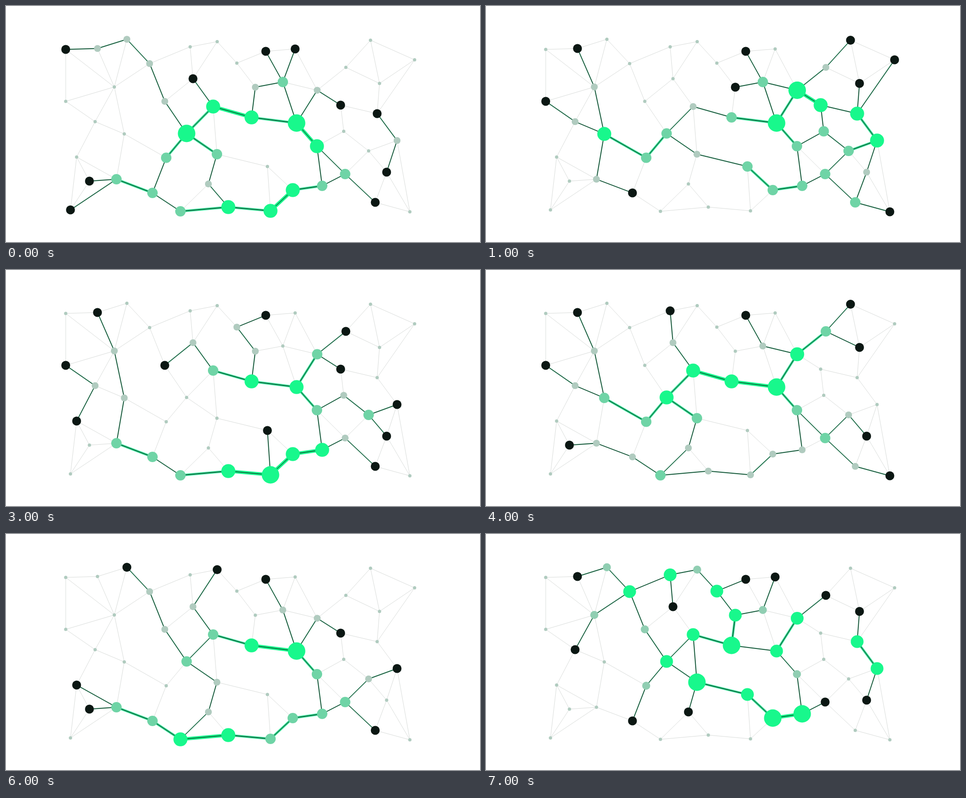
Write an HTML page with a canvas that moves like this. It is 1000 px wide and 500 px high and loops after 8000 ms.

```html
<!DOCTYPE html>
<html lang="en">
<head>
<meta charset="utf-8">
<title>Network</title>
<style>
html, body { margin: 0; height: 100%; overflow: hidden; background: #fff; }
canvas { display: block; }
</style>
</head>
<body>
<canvas id="stage" width="1000" height="500"></canvas>
<script>
const ctx = document.getElementById('stage').getContext('2d');
const GREY = '#b0cbbf', MINT = '#90ceb2', MID = '#6fd4a6', BRIGHT = '#18f88c', BLACK = '#0b1713';
const LINK_COLORS = [MID, '#35e497', BRIGHT];

// Every node has a one-letter name, in this order.
const names = [...'abcdefghijklmnopqrstuvwxyzABCDEFGHIJKLMNOPQRSTUVWX'];
const xy = [
  126, 92, 193, 90, 255, 70.5, 303, 122, 228.5, 171.5, 126, 202, 188, 245, 249.5, 271,
  149, 320, 176, 371, 233, 367, 136, 432, 309, 396, 368, 435, 338, 321.5, 381, 270,
  335, 202, 388.5, 86.5, 445.5, 75.5, 394.5, 154, 437, 213, 445, 314, 427, 377, 469, 426,
  558, 434, 551.5, 340, 605, 390, 667, 381, 656, 297, 613, 248, 518, 236, 526, 172,
  487, 121, 548, 96, 610, 91, 584, 161, 656.5, 178.5, 706, 210, 717, 130, 769, 72.5,
  862, 114, 788, 164, 783, 228, 825, 285, 712.5, 265.5, 765, 307, 715.5, 356, 803, 352,
  779, 416, 852, 436
];
const at = Object.fromEntries(names.map((name, i) => [name, [xy[2 * i], xy[2 * i + 1]]]));

// Each word is a chain of linked nodes.
const web = 'abcdeafgi be ceg efg ehg ijl ilkj ikh kmo mn hopqdrst rtq tuvp pu uEFGHIJF sG ' +
  'HJKI JDEDK DCBU AB CUTSC SLK LQR KMNPM NOPQO RTVRXVWX UW nxyAzy nwx wvz';

// Traffic per second: links that carry one, two and three routes.
const states = [
  ['abcdqp tu vwx omn jkl DKL DJFE HJI CBU CUW QRV', 'upo pv ED km nxy AB', 'uE DC yA'],
  ['beh fgh hkm vpuE vz CBU CSLQO PQ STUWX WVR KJD FJH KMN', 'hop EDC DK zAB TRQ', 'KL'],
  ['baf aedc hk stqdqpv tuEFG nwx vzA CBUWX CDKJI NMP', 'eh drsG vw AB FJ KM', 'uv'],
  ['behk fgi qtu HGFE MKL CSTR TV CBUW mn zy', 'km nx uEDK DC', 'xyAB'],
  ['beh fgh jkmnxyA vwn rtu NMP HJK CBA CUWX VTU', 'hopv pu CDKM', 'uED'],
  ['ab opuv EF EDKJ FG rs MPO vwx nxyzv yABUC UTS TR UWX', 'bc pv uE JF Gs KM', 'cdqp'],
  ['cdqpvwn ikj stu pu DJH DKL CBUW UTR', 'kmn xyAB uE DC', 'nx ED'],
  ['bcdeg drsG rt HGFJI ED KM DCBU wvup pv dqpom PQ RV', 'FEu DK vzA QR', 'AB']
];

// Distinct links of a list of chains, as two sorted letters each.
function links(text) {
  const found = new Set();
  for (const chain of text.split(' ')) {
    for (let i = 1; i < chain.length; i++) found.add([chain[i - 1], chain[i]].sort().join(''));
  }
  return [...found];
}

function line([a, b], width, color) {
  ctx.lineWidth = width;
  ctx.strokeStyle = color;
  ctx.beginPath();
  ctx.moveTo(...at[a]);
  ctx.lineTo(...at[b]);
  ctx.stroke();
}

function dot(name, radius, color) {
  ctx.fillStyle = color;
  ctx.beginPath();
  ctx.arc(...at[name], radius, 0, Math.PI * 2);
  ctx.fill();
}

const shade = part => part > 0.5 ? BRIGHT : part > 0.4 ? MID : part > 0.3 ? MINT : GREY;

function draw(state) {
  ctx.fillStyle = '#fff';
  ctx.fillRect(0, 0, 1000, 500);
  for (const link of links(web)) line(link, 1, '#dadddb');

  const load = Object.fromEntries(names.map(name => [name, 0]));
  state.forEach((text, i) => {
    for (const link of links(text)) {
      line(link, 2.4 + 2.4 * i, LINK_COLORS[i]);
      line(link, 1, '#000');
      for (const name of link) load[name] += i + 1;
    }
  });

  // A route uses two links of each node it passes; a load of one is a route's end.
  const level = name => Math.ceil(load[name] / 2);
  const top = Math.max(...names.map(level));
  for (const name of names) {
    const part = level(name) / top;
    if (load[name] === 1) dot(name, 9.4, BLACK);
    else dot(name, 3.5 + 15 * part, shade(part));
  }
}

let shown = -1;
function tick(now) {
  const step = Math.floor(now / 1000) % states.length;
  if (step !== shown) draw(states[shown = step]);
  requestAnimationFrame(tick);
}
tick(performance.now());
</script>
</body>
</html>
```
